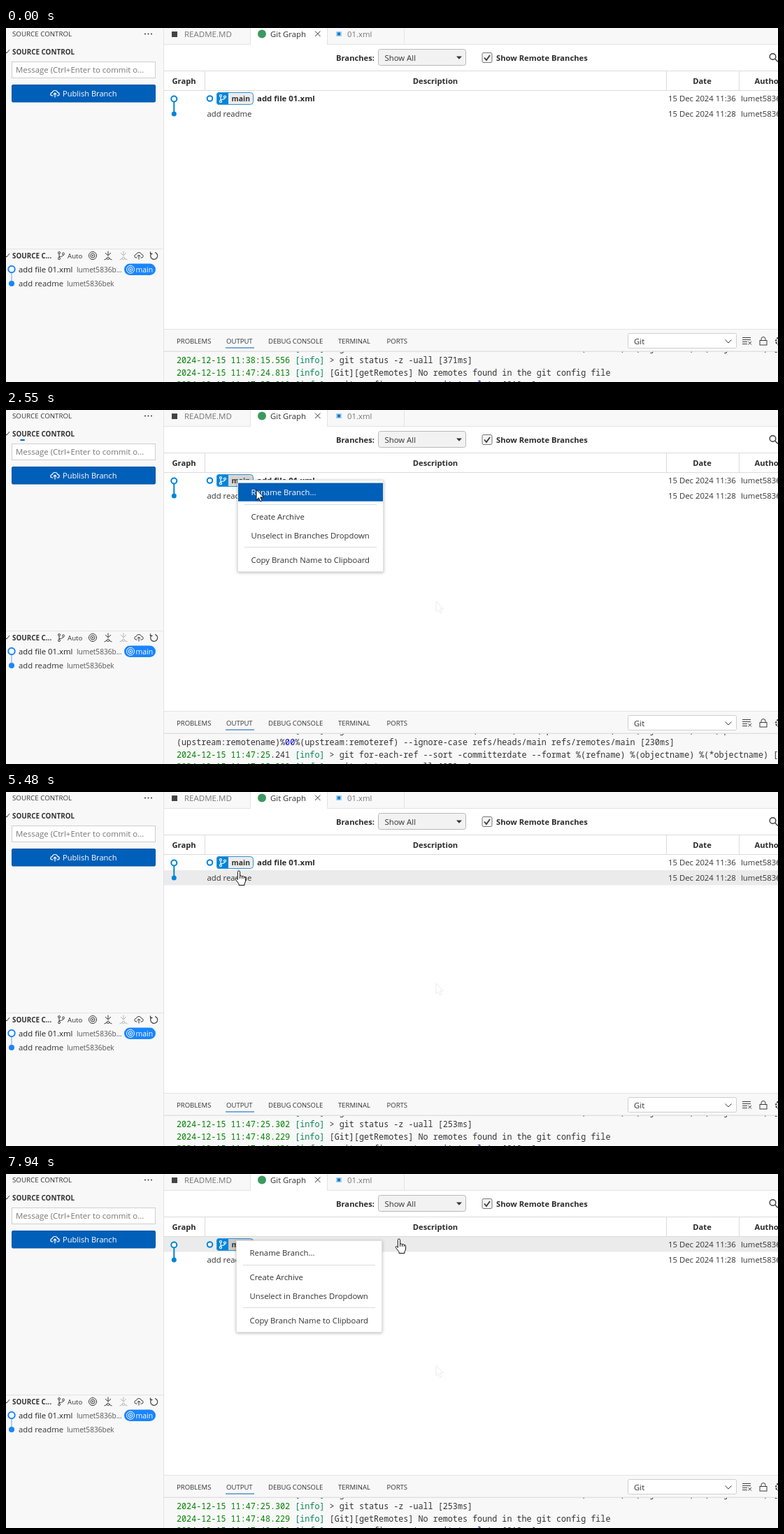
An HTML page for the animation above (8 s loop, 1104 by 507 pixels).

```html
<!DOCTYPE html>
<html lang="en">
<head>
<meta charset="utf-8">
<title>Renaming a branch</title>
<style>
html, body { margin: 0; width: 100%; height: 100%; overflow: hidden; background: #fff; }
svg { display: block; font: 11.35px "Open Sans", "Noto Sans", sans-serif; fill: #333; }
.b { font-weight: 700; font-size: 11.2px; fill: #2b2b2b; }
.cap { font-size: 9.75px; }
.capb { font-size: 9.85px; font-weight: 700; }
.tab { font-size: 9.55px; }
.dim { fill: #767676; }
.light { fill: #fff; font-weight: 500; }
.small { font-size: 10.1px; fill: #555; }
.mid { text-anchor: middle; }
.line { fill: none; stroke: #e3e3e3; }
.table { stroke: #dcdcdc; }
.ico { fill: none; stroke: #3b3b3b; }
.card { fill: #fff; stroke: #e2e2e2; filter: drop-shadow(0 1px 2px rgba(0, 0, 0, .28)); }
#log text { font: 11.76px "Noto Sans Mono", "DejaVu Sans Mono", monospace; white-space: pre; }
.date { fill: #008000; }
.info { fill: #098658; }
.num { fill: #0000d0; }
</style>
</head>
<body>
<svg width="1104" height="507" viewBox="0 0 1104 507">
<defs>
  <clipPath id="logClip"><rect x="226" y="463" width="878" height="44"/></clipPath>
  <path id="arrow" d="M0 0V15L3.5 11.8 5.8 17 8.1 16 5.8 10.9H10.5Z" stroke-linejoin="round"/>
  <g id="branch" fill="none"><circle cx="-3" cy="-4" r="1.5"/><circle cx="-3" cy="4.2" r="1.5"/><circle cx="3" cy="-2.5" r="1.5"/><path d="M-3-2.5V2.7M3-1Q3 1.3-3 1.5"/></g>
  <g id="target" fill="none"><circle r="5.5"/><circle r="3"/><circle r=".8"/></g>
  <path id="cloud" fill="none" d="M-2.5 3H-4Q-6.3 2.8-6.2.5-6-1.5-3.8-1.7-3-4.5 0-4.5T3.8-1.7Q6.2-1.5 6.2.7 6 3 4 3H2.5M0 5.5V-.8M-2.3 1.3L0-1 2.3 1.3"/>
  <g id="fetch" fill="none"><path d="M0-6.5V0M-4-4L0 0 4-4M-5.5 6L-1.6 4.2M5.5 6L1.6 4.2"/><circle cy="3.7" r="1.7"/></g>
</defs>

<!-- sidebar -->
<rect width="225" height="507" fill="#f8f8f8"/>
<path class="line" d="M225.5 0V507M0 316.5H225"/>
<text class="cap" x="9" y="11.5">SOURCE CONTROL</text>
<circle cx="199" cy="8.5" r="1"/><circle cx="203.5" cy="8.5" r="1"/><circle cx="208" cy="8.5" r="1"/>
<path class="ico" d="M-2 33L1 36 5 31M-2 325L1 328 5 323"/>
<text class="capb" x="9" y="37.5">SOURCE CONTROL</text>
<rect id="bar" y="42" height="2" fill="#005fb8"/>
<rect x="8.5" y="48.5" width="205" height="23" fill="#fff" stroke="#cecece"/>
<text class="dim" x="14" y="64" font-size="11.45">Message (Ctrl+Enter to commit o...</text>
<rect x="8.5" y="81.5" width="205" height="24.5" rx="1.5" fill="#005fb8" stroke="#0056a6"/>
<use href="#cloud" x="70" y="94" stroke="#fff" stroke-width="1.2"/>
<text class="light" x="81" y="98" font-size="11.1">Publish Branch</text>
<text class="capb" x="9" y="330">SOURCE C...</text>
<g class="ico">
  <use href="#branch" x="79" y="326"/><use href="#target" x="124" y="326"/>
  <use href="#fetch" x="146" y="326"/><use href="#fetch" x="168" y="326" stroke="#b5b5b5"/>
  <use href="#cloud" x="190" y="326"/>
  <path d="M208.5 322.5A5 5 0 1 0 213 321.5M206.5 320.5V323.5H209.5" stroke-width="1.2"/>
</g>
<text x="88" y="330" font-size="9.7">Auto</text>
<path d="M8 351V362" stroke="#1a85ff" opacity=".7"/>
<circle cx="8" cy="345.5" r="4.7" fill="#fff" stroke="#1a85ff" stroke-width="2"/>
<circle cx="8" cy="366" r="4" fill="#1a85ff"/>
<text x="18" y="350" fill="#222">add file 01.xml</text>
<text class="small" x="101" y="350">lumet5836b...</text>
<rect x="169" y="337.5" width="45" height="16.5" rx="8.25" fill="#1a85ff"/>
<use href="#target" x="178" y="345.7" stroke="#fff"/>
<text class="light" x="185.5" y="349.7" font-size="10.5">main</text>
<text x="18" y="370.2">add readme</text>
<text class="small" x="87" y="370.2">lumet5836bek</text>

<!-- editor tabs -->
<path d="M226 0H349V23H226ZM459 0H1104V23H459Z" fill="#f8f8f8"/>
<path class="line" d="M226 23.5H349.5V0M459.5 0V23.5H1104M569.5 0V23"/>
<rect x="237" y="5" width="8" height="8" fill="#444"/>
<text class="dim" x="255" y="12.7" font-size="11.5">README.MD</text>
<circle cx="366" cy="8.5" r="6" fill="#3c9a5f"/>
<text x="378" y="12.7">Git Graph</text>
<path class="ico" d="M442 4.5L449.5 12M449.5 4.5L442 12"/>
<rect x="472" y="5" width="8" height="7" fill="#9fcdf0"/><rect x="474" y="6.5" width="4" height="4" fill="#0a78c8"/>
<text class="dim" x="488" y="12.7">01.xml</text>

<!-- toolbar -->
<text class="b" x="472" y="46.5">Branches:</text>
<rect x="532.5" y="30.5" width="125" height="23" rx="3" fill="#f2f2f2" stroke="#b9b9b9"/>
<text x="541.5" y="46.5">Show All</text>
<path d="M644 40.5H652L648 44.7Z"/>
<rect x="681" y="35.5" width="14" height="14" rx="2" fill="#f4f4f4" stroke="#777"/>
<path class="ico" d="M684 42.5L687 46 692 39" stroke-width="1.8"/>
<text class="b" x="701" y="46.5">Show Remote Branches</text>
<g class="ico" stroke-width="1.4"><circle cx="1096.5" cy="41" r="4.3"/><path d="M1099.5 44L1104 48.5"/></g>

<!-- commit table -->
<rect id="hover" x="226" width="878" height="21.5" fill="#ebebeb"/>
<path class="line table" d="M226 61.5H1104M226 89.5H1104M284.5 61V89M944.5 61V89M1048.5 61V89"/>
<g class="b">
  <text class="mid" x="254.5" y="79.5">Graph</text><text class="mid" x="614" y="79.5">Description</text>
  <text class="mid" x="995.5" y="79.5">Date</text><text x="1070.5" y="79.5">Author</text>
  <text x="359" y="105.2" font-size="11.4">add file 01.xml</text>
</g>
<g stroke="#0085d9" stroke-width="2" fill="#fff">
  <path d="M240.3 101V123"/><circle cx="240.3" cy="101.5" r="4"/><circle cx="240.3" cy="123" r="2.5" fill="#0085d9"/>
  <circle cx="291.5" cy="101" r="3.8"/>
</g>
<rect id="pill" x="301.5" y="92.5" width="52" height="17" rx="4" fill="#808080"/>
<path d="M318 92H305Q301 92 301 96V106Q301 110 305 110H318Z" fill="#0085d9"/>
<rect x="301.5" y="92.5" width="52" height="17" rx="4" fill="none" stroke="#2f93d3"/>
<use href="#branch" x="310" y="101" stroke="#fff" stroke-width="1.2"/>
<text x="322.5" y="105.2" font-size="10.4" font-weight="700">main</text>
<text x="287.5" y="127.3" font-size="11.3">add readme</text>
<text x="947" y="105.2">15 Dec 2024 11:36</text><text x="1051" y="105.2">lumet5836bek</text>
<text x="947" y="127.3">15 Dec 2024 11:28</text><text x="1051" y="127.3">lumet5836bek</text>

<!-- output panel -->
<rect x="226" y="431" width="878" height="76" fill="#f8f8f8"/>
<path class="line" d="M226 431.5H1104"/>
<g class="tab">
  <text x="244" y="452">PROBLEMS</text><text x="315" y="452">OUTPUT</text><text x="375" y="452">DEBUG CONSOLE</text>
  <text x="475" y="452">TERMINAL</text><text x="544.5" y="452">PORTS</text>
</g>
<path d="M314 458H355" stroke="#005fb8"/>
<rect x="889.5" y="437.5" width="155" height="21" rx="2" fill="#fff" stroke="#cecece"/>
<text x="898" y="452.5">Git</text>
<g class="ico">
  <path d="M1028.5 446.5L1033 451 1037.5 446.5"/>
  <path d="M1053 443.5H1065M1053 446.5H1065M1053 449.5H1060M1053 452.5H1060M1061.5 449L1066 453.5M1066 449L1061.5 453.5"/>
  <rect x="1078" y="447.5" width="10" height="6.5"/><path d="M1080 447.5V445.5Q1080 442.5 1083 442.5T1086 445.5V447.5"/>
  <circle cx="1106" cy="448.5" r="5" stroke-dasharray="2.6 1.2" stroke-width="2"/><circle cx="1106" cy="448.5" r="2"/>
</g>
<g clip-path="url(#logClip)"><g id="log"></g></g>
<rect x="226" y="462.5" width="878" height="1.5" fill="#ddd" opacity=".8"/>

<!-- overlays -->
<use id="ghost" href="#arrow" x="615" y="274" fill="#fff" stroke="#ebebeb"/>
<g id="menu">
  <rect class="card" x="-.5" y=".5" width="208" height="131"/>
  <path class="line table" d="M9 35.5H198M9 96.5H198"/>
  <rect id="pick" width="207" height="26.3" fill="#005fb8"/>
</g>
<g id="pointer" stroke="#111" fill="#fff" stroke-linejoin="round">
  <use id="tip" href="#arrow"/>
  <path id="hand" d="M-1.6 12V1.5Q-1.6 0 0 0T1.6 1.5V7.2Q3.5 6.4 4.5 7.8 6.5 7 7.2 8.5 9.6 8 9.6 10.5V14Q9.6 16 8 18V20.5H0V18.5L-4.6 12.5Q-5.3 10.8-3.8 10.6-2.6 10.8-1.6 12.5ZM1.6 7.2V11M4.5 8V11M7.2 9V11"/>
</g>
</svg>
<script>
const $ = id => document.getElementById(id);
const LOOP = 8000, STEP = 70, LINE = 17.6;

// Pointer strokes of [ms, x, y]; the pointer rests between strokes.
const strokes = [
  [[520, 652, 297], [590, 615, 274]],
  [[850, 585, 125], [920, 530, 42]],
  [[1130, 505, 50], [1620, 335, 103]],
  [[2020, 333, 102], [2090, 332, 101], [2340, 334, 103], [2550, 358, 114], [2770, 368, 117]],
  [[2840, 370, 118], [3580, 395, 136]],
  [[3650, 398, 139], [4070, 470, 147]],
  [[4600, 399, 149], [4810, 298, 138]],
  [[5010, 300, 134], [5480, 333, 113], [5810, 322, 90], [5880, 330, 91]],
  [[6210, 331, 97], [6340, 331, 98]],
  [[7000, 344, 104], [7070, 352, 106]],
  [[7270, 380, 106], [7480, 500, 98]],
  [[7940, 562, 93]]
];
const menus = [{ from: 2090, to: 5150, x: 332, y: 100 }, { from: 6210, to: LOOP, x: 330, y: 95 }];
const items = [["Rename Branch...", 4.5], ["Create Archive", 39.5], ["Unselect in Branches Dropdown", 66], ["Copy Branch Name to Clipboard", 101]];
const scrolls = [[0, 0], [2340, 2], [2480, 4], [2860, 6]];
const busy = { from: 2170, to: 3050 };

const entry = (clock, text, tail = "") =>
  `<tspan class="date">2024-12-15 ${clock}</tspan>${tail} <tspan class="info">[info]</tspan> ${text}`;
const remotes = "[Git][getRemotes] No remotes found in the git config file";
const config = '&gt; git config --get <tspan class="num">commit.template</tspan> [212ms]';
const refs = "&gt; git for-each-ref --sort -committerdate --format %(refname) %(objectname) %(*objectname) [215ms]";
const nul = '%<tspan class="num">00</tspan>%';
$("log").innerHTML = [
  entry("11:38:15.174", refs),
  entry("11:38:15.556", "&gt; git status -z -uall [371ms]"),
  entry("11:47:24.813", remotes),
  entry("11:47:25.010", config),
  entry("11:47:25.236", `&gt; git for-each-ref --format=%(refname)${nul}(upstream:short)${nul}(objectname)${nul}(upstream:track)${nul}`),
  `(upstream:remotename)${nul}(upstream:remoteref) --ignore-case refs/heads/main refs/remotes/main [230ms]`,
  entry("11:47:25", refs, ".241"),
  entry("11:47:25.302", "&gt; git status -z -uall [253ms]"),
  entry("11:47:48.229", remotes),
  entry("11:47:48.431", config)
].map((s, i) => `<text x="244" y="${462.6 + i * LINE}">${s}</text>`).join("");

const labels = items.map(([name, y]) => {
  const el = document.createElementNS("http://www.w3.org/2000/svg", "text");
  el.textContent = name;
  el.setAttribute("x", 18.5);
  el.setAttribute("y", y + 17.8);
  return $("menu").appendChild(el);
});

const show = (id, on) => $(id).style.display = on ? "" : "none";
const move = (id, x, y) => $(id).setAttribute("transform", `translate(${x} ${y})`);

function pointerAt(t) {
  const stroke = strokes.filter(s => s[0][0] <= t).pop();
  if (!stroke) return null;
  const i = stroke.findLastIndex(p => p[0] <= t);
  const [t0, x0, y0] = stroke[i], next = stroke[i + 1];
  if (!next) return [x0, y0];
  const k = Math.floor((t - t0) / STEP) * STEP / (next[0] - t0);
  return [x0 + (next[1] - x0) * k, y0 + (next[2] - y0) * k].map(Math.round);
}

function draw(t) {
  const pos = pointerAt(t), [x, y] = pos || [-99, -99];
  const menu = menus.find(m => t >= m.from && t < m.to);
  const inMenu = menu && x >= menu.x - 1 && x < menu.x + 208 && y >= menu.y && y < menu.y + 131;
  const onRow = !inMenu && x > 226 && y >= 90 && y < 134;
  const onPill = onRow && x > 301 && x < 354 && y < 112;

  show("hover", onRow);
  $("hover").setAttribute("y", y < 112 ? 90 : 112);
  $("pill").setAttribute("opacity", onPill || menu ? .32 : .15);

  show("menu", menu);
  if (menu) {
    const picked = inMenu ? items.findIndex(([, top]) => y - menu.y >= top - 1 && y - menu.y < top + 26) : -1;
    move("menu", menu.x, menu.y);
    show("pick", picked >= 0);
    if (picked >= 0) $("pick").setAttribute("y", items[picked][1]);
    labels.forEach((el, i) => el.style.fill = i === picked ? "#fff" : "");
  }

  show("pointer", pos);
  move("pointer", x, y);
  show("hand", onRow && !onPill);
  show("tip", !onRow || onPill);
  show("ghost", t >= 850);

  // Progress bar drifts right while it widens.
  const s = Math.max(0, t - busy.from) / 1000;
  const width = 4.5 * (1 + s);
  show("bar", t >= busy.from && t < busy.to);
  $("bar").setAttribute("width", width);
  $("bar").setAttribute("x", 2.25 + 56 * s - width / 2);

  move("log", 0, -LINE * scrolls.filter(p => p[0] <= t).pop()[1]);
}

const start = performance.now();
(function tick() {
  draw((performance.now() - start) % LOOP);
  requestAnimationFrame(tick);
})();
</script>
</body>
</html>
```
